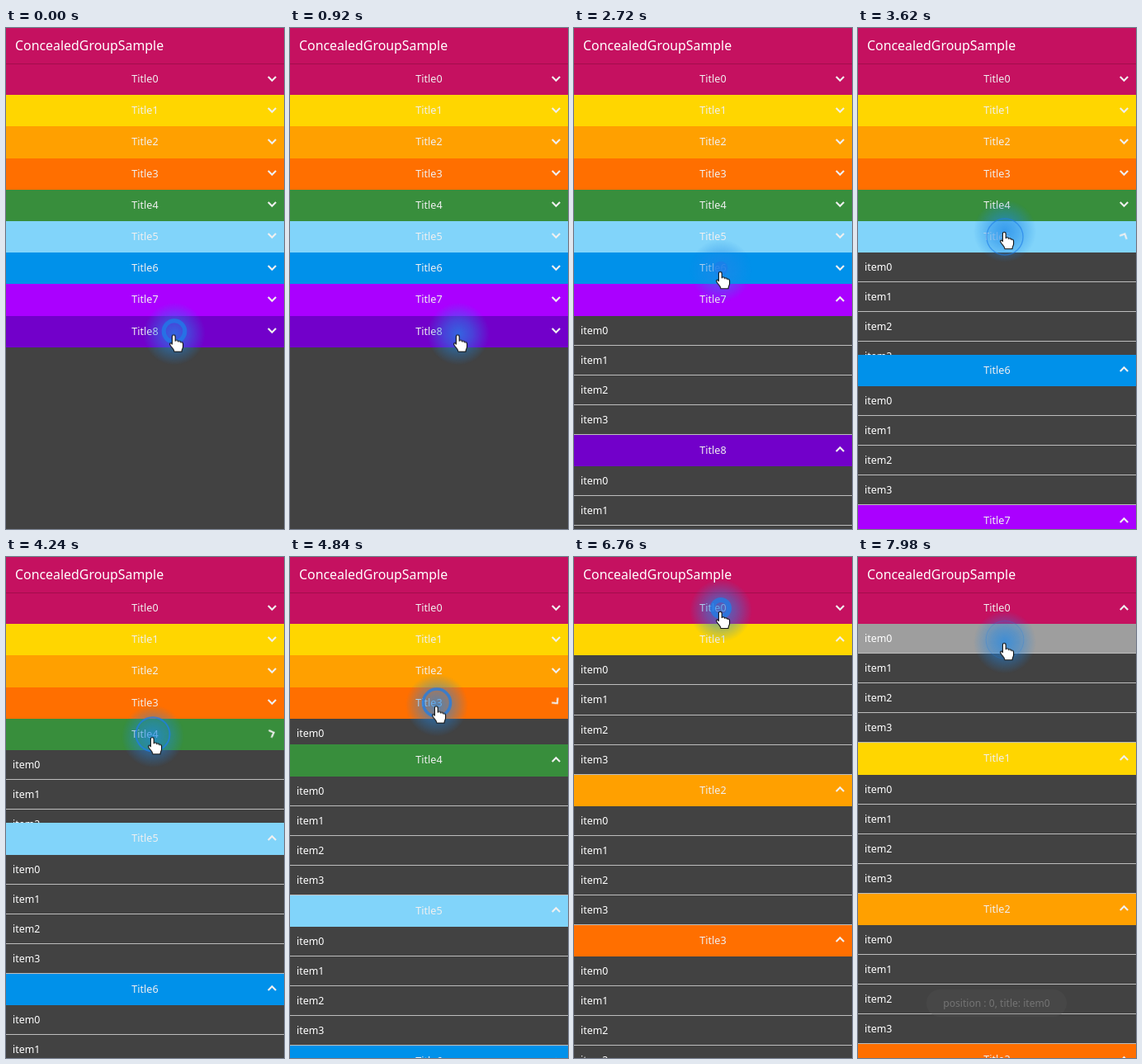
These frames come from a looping animation (337x607 px, 8000 ms). An HTML page:

```html
<!DOCTYPE html>
<html lang="en">
<head>
<meta charset="utf-8">
<title>Expanding list</title>
<style>
  html, body { margin: 0; width: 100%; height: 100%; overflow: hidden; background: #424242; }
  body { position: relative; font: 12.4px "Noto Sans", sans-serif; color: #fff; }
  .bar {
    box-sizing: border-box; height: 43px; padding-left: 11px;
    background: #c51160; font-size: 15.9px; line-height: 42px;
  }
  .title {
    position: relative; height: 38.2px; color: #f0f0f0;
    font-size: 12.6px; line-height: 38px; text-align: center;
  }
  .group:first-child .title { box-shadow: inset 0 1px #a30d4d; }
  .chevron { position: absolute; left: 315px; top: 10.5px; width: 15px; height: 15px; }
  .chevron path { fill: none; stroke: #f0f0f0; stroke-width: 2.1; }
  .panel { height: 0; overflow: hidden; }
  .item {
    box-sizing: border-box; height: 36.05px; padding-left: 8px;
    border-bottom: 1px solid #bdbdbd; line-height: 35px;
  }
  .toast {
    position: absolute; left: 83px; top: 524px; width: 170px; height: 33px;
    border-radius: 17px; background: #585858; text-align: center;
    font-size: 12.1px; line-height: 33px; opacity: 0;
  }
  .overlay { position: absolute; left: 0; top: 0; width: 337px; height: 607px; }
  .ring { fill: none; stroke: #1e7ee8; stroke-opacity: .75; }
</style>
</head>
<body>
<div class="bar">ConcealedGroupSample</div>
<div id="list"></div>
<div class="toast">position : 0, title: item0</div>
<svg class="overlay" viewBox="0 0 337 607">
  <defs>
    <radialGradient id="glow">
      <stop offset="0" stop-color="#1e88e8" stop-opacity=".75"/>
      <stop offset=".45" stop-color="#1e88e8" stop-opacity=".48"/>
      <stop offset="1" stop-color="#1e88e8" stop-opacity="0"/>
    </radialGradient>
  </defs>
  <g class="cursor"><circle r="38" fill="url(#glow)"/></g>
  <g id="rings"></g>
  <g class="cursor">
    <path fill="#fff" stroke="#111" stroke-width="1.1" stroke-linejoin="round"
      d="M-2.6 3.2C-2.6 .6 1.2 .6 1.2 3.2V8.4C2 7.4 4.4 7.6 4.6 9.2C5.6 8.4 7.6 8.8 7.8 10.2C9 9.6 10.6 10.2 10.6 12V15.5C10.6 17.5 9 18.5 9 21.5H0C0 19-2.5 17.5-5 13.5C-6.4 11.4-4 10.2-2.6 12.4Z"/>
  </g>
</svg>
<script>
  const LOOP = 8000, OPEN_TIME = 250, RING_TIME = 335, ITEM_CLICK = 7750;
  const SINE = 'cubic-bezier(.37, 0, .63, 1)';
  const colors = ['#c51160', '#ffd600', '#ffa000', '#ff6f00', '#388e3c',
    '#81d4fa', '#0091ea', '#aa00ff', '#7200ca'];

  // Rows open one after another from the bottom up, in a steady rhythm.
  const openTime = row => 6758 - 665 * row;
  const rowY = row => 62 + 38.2 * row;

  // Runs [ms, style] steps within the loop, holding the first and last states.
  function track(el, steps, easing = 'linear') {
    const kept = steps.filter(([ms]) => ms >= 0 && ms <= LOOP);
    const all = [[0, kept[0][1]], ...kept, [LOOP, kept.at(-1)[1]]];
    el.animate(all.map(([ms, style]) => ({ ...style, offset: ms / LOOP, easing })),
      { duration: LOOP, iterations: Infinity });
  }

  function addGroup(color, row) {
    const group = document.createElement('div');
    group.className = 'group';
    group.innerHTML = `<div class="title" style="background:${color}">Title${row}
      <svg class="chevron" viewBox="-7.5 -7.5 15 15"><path d="M-4.7-2.4 0 2.3 4.7-2.4"/></svg></div>
      <div class="panel">${[0, 1, 2, 3].map(n => `<div class="item">item${n}</div>`).join('')}</div>`;
    document.getElementById('list').append(group);
    const start = openTime(row), end = start + OPEN_TIME;
    track(group.querySelector('.panel'), [[start, { height: '0px' }], [end, { height: '144.2px' }]], SINE);
    track(group.querySelector('.chevron'),
      [[start, { transform: 'rotate(0deg)' }], [end, { transform: 'rotate(-180deg)' }]], SINE);
  }

  // A thick dot that widens into a thin, fading ring.
  function addRing({ ms, x, y }) {
    const circle = document.createElementNS('http://www.w3.org/2000/svg', 'circle');
    circle.setAttribute('class', 'ring');
    circle.setAttribute('cx', x);
    circle.setAttribute('cy', y);
    document.getElementById('rings').append(circle);
    const steps = [];
    for (let i = 0; i <= 12; i++) {
      const p = i / 12, grown = 1 - (1 - p) ** 2;
      steps.push([ms - 80 + p * RING_TIME, {
        r: `${23 * grown}px`,
        strokeWidth: `${10 - 9 * grown}px`,
        opacity: Math.min(1, (1 - p) * 4)
      }]);
    }
    track(circle, steps);
  }

  colors.forEach(addGroup);

  const click = (ms, row, x = 178) => ({ ms, x, y: rowY(row) });
  const clicks = [
    click(-30, 8, 204),
    ...colors.map((_, row) => click(openTime(row), row, row === 8 ? 204 : 178)).reverse(),
    click(ITEM_CLICK, 1)
  ];
  clicks.forEach(addRing);

  // The hand rests on each click, then glides on to the next one.
  const at = ({ x, y }) => ({ transform: `translate(${x}px, ${y + 3}px)` });
  const moves = clicks.slice(1).flatMap((to, i) => [
    [clicks[i].ms + 130, at(clicks[i])], [clicks[i].ms + 300, at(to)]
  ]);
  document.querySelectorAll('.cursor').forEach(el => track(el, moves, SINE));

  track(document.querySelector('.item'),
    [[ITEM_CLICK - 100, { background: '#9e9e9e00' }], [ITEM_CLICK, { background: '#9e9e9e' }]]);
  track(document.querySelector('.toast'),
    [[ITEM_CLICK + 150, { opacity: 0 }], [LOOP, { opacity: .32 }]]);
</script>
</body>
</html>
```
